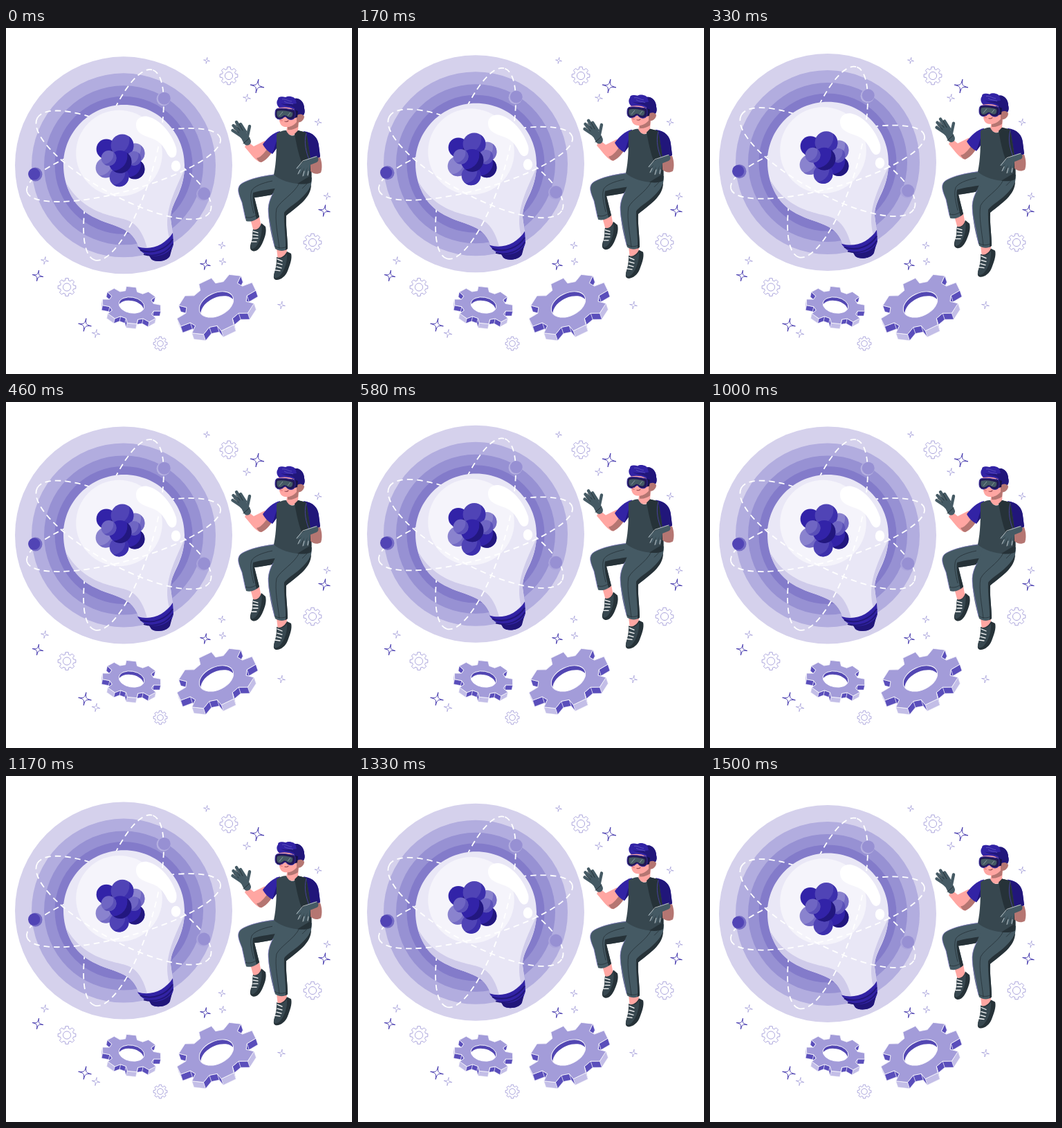
An HTML page that plays this animation: 500 by 500 pixels, repeating every 1540 ms.

```html
<!DOCTYPE html>
<html lang="en">
<head>
<meta charset="utf-8">
<title>Floating idea</title>
<style>
html,body{margin:0;width:100%;height:100%;overflow:hidden;background:#fff}
svg{display:block;width:100%;height:100%}
.dash{fill:none;stroke:#fff;stroke-width:1.8;stroke-dasharray:8.5 6}
.skin{fill:#ffa6a2}.skinD{fill:#b57672}
.v{fill:#37474f}.vD{fill:#263238}.pant{fill:#455a64}
.p{fill:#3223a5}.pD{fill:#21167a}
.lace{fill:none;stroke:#fff;stroke-width:1.3;stroke-linecap:round}
.seam{fill:none;stroke:#263238;stroke-width:.8}
.edge{fill:none;stroke:#8a82d0;stroke-width:.7}
.hand path{fill:none;stroke-linecap:round;stroke-linejoin:round}
</style>
</head>
<body>
<svg viewBox="0 0 500 500">
<g id="deco"></g>
<g id="gears"></g>
<g id="bulb">
  <g id="rings"></g>
  <g id="back"></g>
  <path fill="#e9e7f6" d="M170.5 111C219 111 258 150 258 198C258 240 237 252 238 276L241 298L216 320L192 317C188 305 181 295 166 289C150 282 135 279 119 269C97 255 83 228 83 198C83 150 122 111 170.5 111Z"/>
  <path fill="#cfcbea" d="M87 224C94 249 106 261 119 269C135 279 150 282 166 289C181 295 188 305 192 317L204 318C200 303 194 289 182 281C166 270 118 276 87 224Z"/>
  <path fill="#cfcbea" d="M258 204C256 238 237 252 238 276L241 298L236 303C227 270 240 243 258 204Z"/>
  <circle cx="163.500" cy="181" r="62.300" fill="#f5f4fb"/>
  <path fill="#fff" d="M188 141C187 132 195 126 205 128C223 132 240 153 246 173C248 183 244 189 238 187C232 184 232 175 222 166C212 156 189 158 188 141Z"/>
  <ellipse cx="245.500" cy="199.500" rx="6.700" ry="8" fill="#fff"/>
  <path class="p" d="M190 316C209 322 230 314 241 296L242 312C241 319 237 322 237 329C233 338 215 339 210 334L207 329C199 327 193 321 190 316Z"/>
  <path class="pD" d="M207 329C220 332 234 326 240 317C239 322 238 325 237 329C233 338 215 339 210 334Z"/>
  <path fill="none" stroke="#21167a" stroke-width="2" d="M194 321C213 328 232 319 241 305M199 327C216 332 233 325 241 312"/>
  <g id="atom"></g>
  <g id="front"></g>
  <g id="moons"></g>
</g>
<g id="man">
  <!-- legs -->
  <path class="skin" d="M353 276L366 272L369 288L358 294Z"/>
  <path class="skin" d="M391 318L406 318L405 333L393 336Z"/>
  <path class="vD" d="M357 291C362 293 367 289 369 282L375 287C377 295 374 303 370 312C366 320 361 324 356 322C351 320 353 313 355 308C357 302 356 297 357 291Z"/>
  <path class="v" d="M357 291C362 294 367 290 369 284C371 294 368 307 362 315C359 319 355 320 354 318C353 314 355 310 356 306C357 301 356 296 357 291Z"/>
  <path class="lace" d="M357 294l7 2M357 299l7 1M357 304l7 0M355 309l7 0"/>
  <path class="vD" d="M391 331C397 334 403 329 406 323L412 326C414 333 410 343 407 351C404 359 396 365 390 364C385 363 387 356 389 350C391 343 391 337 391 331Z"/>
  <path class="v" d="M391 331C397 335 403 331 406 326C407 337 403 350 396 358C392 362 388 362 387 359C387 355 390 349 390 345C392 340 391 336 391 331Z"/>
  <path class="lace" d="M392 334l7 3M392 340l7 2M391 345l7 2M389 350l7 1"/>
  <path class="pant" d="M392 211C372 213 346 219 338 227C333 233 337 242 341 252L347 279C354 281 361 278 366 273L359 245C376 243 391 240 402 235Z"/>
  <path class="vD" d="M398 230C385 233 369 234 357 238C355 249 359 262 362 276L366 273L359 245C376 243 391 240 402 235Z"/>
  <path class="seam" d="M385 221C370 224 358 229 355 235C352 244 355 255 358 268M346 273C353 276 360 272 365 268"/>
  <path class="edge" d="M388 212C370 214 346 219 338 227C333 233 337 242 341 252L346 276"/>
  <path class="pant" d="M394 215C390 235 378 248 379 264C380 285 384 302 389 319C395 323 402 323 407 319C407 302 404 286 405 271C421 258 442 244 442 216Z"/>
  <path class="vD" d="M441 226C433 247 409 257 402 267C401 284 405 305 404 321L407 319C407 302 404 286 405 271C421 258 441 246 441 226Z"/>
  <path class="seam" d="M424 224C416 240 397 249 391 261C388 277 393 299 395 319M388 315C394 319 401 319 407 315M435 225L428 232"/>
  <path class="edge" d="M386 239C379 250 378 262 380 275L388 316"/>
  <!-- raised arm -->
  <path class="skin" d="M349 164L358 171L374 163L386 176C382 184 375 191 369 194C362 194 353 181 345 172Z"/>
  <path class="skinD" d="M362 188C370 187 375 176 381 172L385 178C381 186 374 192 369 194C366 194 364 191 362 188Z"/>
  <path class="p" d="M396 149C386 151 377 160 371 168C374 174 379 179 385 182L393 171Z"/>
  <path class="pD" d="M393 157L385 182L393 171Z"/>
  <g class="hand" stroke="#455a64">
    <path stroke-width="4.400" d="M338 155L327.500 148M339 151L328.500 141M342 150L333 136M346 150L339 139M349 156L352 142"/>
    <path stroke-width="11" d="M341 153L345 157L348.500 164"/>
    <path stroke="#263238" stroke-width="1" d="M336 151L329 145M338 148L332 140M342 148L337 139M343 167L352 159"/>
  </g>
  <!-- torso -->
  <path class="skin" d="M407 137L423 132L422 150C416 158 409 156 405 150Z"/>
  <path class="skinD" d="M407 143C415 142 419 137 423 133L422 143C417 146 412 148 407 147Z"/>
  <path class="p" d="M430 149C444 151 451 159 452 170L454 186C449 190 443 191 437 189Z"/>
  <path class="pD" d="M431 150C444 151 451 159 452 170L454 186C449 190 443 191 437 189C432 176 430 161 431 150Z"/>
  <path class="v" d="M405 148C400 148 394 150 391 153C391 173 391 194 387 212C398 222 424 229 441 223C443 201 438 176 434 151L422 148C419 158 409 158 405 148Z"/>
  <path class="vD" d="M422 148L434 151C438 176 443 201 441 223C435 226 428 226 421 225L439 214C425 198 421 174 417 153Z"/>
  <path fill="none" stroke="#5044b6" stroke-width=".8" d="M434 152C430 166 434 180 438 190"/>
  <!-- lowered arm -->
  <path class="skinD" d="M440 189L454 187C457 195 457 203 455 209C450 212 444 211 440 207Z"/>
  <g class="hand" stroke="#455a64">
    <path stroke-width="9" d="M447 190L437 194L432 197"/>
    <path stroke-width="4" d="M432 194L422 202M432 197L424 209M434 199L430.500 212M438 198L436 211"/>
    <path stroke="#d7dde0" stroke-width=".8" d="M420 203L429 192L449 185.500M422 211L425 205M429 214L431 207M436 213L437 207"/>
  </g>
  <!-- head -->
  <path class="skin" d="M394 114C392 120 395 126 395 132C395 138 398 142 403 143C412 144 419 139 422 130L422 113Z"/>
  <path class="p" d="M395 115C390 111 391 105 393 103C393 98 400 99 404 100C409 97 416 100 418 102C425 101 431 108 431 116C433 123 430 129 424 128L418 126L417 118C410 114 402 114 395 115Z"/>
  <path class="pD" d="M418 102C425 101 431 108 431 116C433 123 430 129 424 128L418 126L417 116C412 112 404 113 397 109C406 111 413 110 420 109Z"/>
  <path fill="none" stroke="#6b61c4" stroke-width=".7" d="M399 103C405 102 408 106 413 106M402 106C406 109 411 108 415 110"/>
  <path class="skinD" d="M420 127C423 123 430 124 431 128C431 133 425 138 420 136Z"/>
  <path fill="#171248" d="M413 117L422 120L421 129L414 131Z"/>
  <path fill="#211855" stroke="#372aa5" d="M391 117C398 115 410 117 417 119C419 122 418 129 416 131C412 134 407 132 404 128C401 128 400 132 396 132C391 132 389 129 389 125C389 121 389 119 391 117Z"/>
  <path fill="#455a64" d="M392 120C398 118 409 120 414 122C415 126 413 129 411 129C406 129 406 126 402 126C399 128 397 130 394 129C391 128 391 123 392 120Z"/>
  <path fill="none" stroke="#8998a0" stroke-width="1" d="M395 127L400 121M407 127L411 122"/>
  <path fill="none" stroke="#9d4f54" stroke-width="1.200" stroke-linecap="round" d="M403 135Q406 136 408 134"/>
  <path fill="none" stroke="#e47c7d" d="M398 131L397 134L400 134"/>
</g>
</svg>
<script>
const NS = 'http://www.w3.org/2000/svg';
const $ = id => document.getElementById(id);
const rad = a => a * Math.PI / 180;

function add(parent, tag, attrs) {
  const el = document.createElementNS(NS, tag);
  for (const k in attrs) el.setAttribute(k, attrs[k]);
  return parent.appendChild(el);
}
const circle = (g, cx, cy, r, fill) => add(g, 'circle', { cx, cy, r, fill });
const poly = pts => 'M' + pts.map(p => p.map(n => n.toFixed(2)).join(' ')).join('L') + 'Z';

// Eight-tooth outline, mapped onto a tilted ellipse
function cog(x, y, a, b, tilt, phase = 0, root = .77) {
  const c = Math.cos(rad(tilt)), s = Math.sin(rad(tilt)), pts = [];
  for (let i = 0; i < 8; i++) {
    for (const [da, r] of [[-15, root], [-9.5, 1], [9.5, 1], [15, root]]) {
      const t = rad(i * 45 + phase + da);
      const u = a * r * Math.cos(t), v = b * r * Math.sin(t);
      pts.push([x + u * c - v * s, y + u * s + v * c]);
    }
  }
  return pts;
}

function solidGear(id, x, y, a, b, tilt, phase, dx, dy, hole) {
  const g = $('gears'), pts = cog(x, y, a, b, tilt, phase);
  // Tooth tips catch the light; flanks and gaps stay dark
  const sides = pts.map((p, i) => ({ p, q: pts[(i + 1) % pts.length], tip: i % 4 === 1 }))
    .sort((m, n) => m.p[1] + m.q[1] - n.p[1] - n.q[1]);
  for (const { p, q, tip } of sides) {
    add(g, 'path', {
      d: poly([p, q, [q[0] + dx, q[1] + dy], [p[0] + dx, p[1] + dy]]),
      fill: tip ? '#c3beE7' : '#5a4ebb', stroke: '#fff', 'stroke-width': .5
    });
  }
  add(g, 'path', { d: poly(pts), fill: '#a39cd9', stroke: '#fff', 'stroke-width': .8 });
  const oval = { cx: x, cy: y, rx: a * hole, ry: b * hole, transform: `rotate(${tilt} ${x} ${y})` };
  add(add(g, 'clipPath', { id }), 'ellipse', oval);
  add(g, 'ellipse', { ...oval, fill: '#5347b3' });
  add(add(g, 'g', { 'clip-path': `url(#${id})` }), 'ellipse',
    { ...oval, fill: '#fff', transform: `translate(${dx * .7} ${dy * .7}) ${oval.transform}` });
  add(g, 'ellipse', { ...oval, fill: 'none', stroke: '#fff', 'stroke-width': .9 });
}

function lineGear(x, y, r) {
  const style = { fill: '#fff', stroke: '#a39cd9', 'stroke-width': .9, 'stroke-linejoin': 'round' };
  add($('deco'), 'path', { d: poly(cog(x, y, r, r, 0, 0, .76)), ...style });
  add($('deco'), 'circle', { cx: x, cy: y, r: r * .43, ...style });
}

function spark(x, y, r, dark) {
  const k = r * .1, c = (sx, sy) => `C${sx * k} ${sy * k} ${sx * k} ${sy * k} `;
  add($('deco'), 'path', {
    d: `M0 ${-r}${c(1, -1)}${r} 0${c(1, 1)}0 ${r}${c(-1, 1)}${-r} 0${c(-1, -1)}0 ${-r}Z`,
    transform: `translate(${x} ${y}) rotate(11)`,
    fill: '#fff', stroke: dark ? '#4134ac' : '#9c95d6', 'stroke-width': dark ? .9 : .7
  });
}

function ball(g, x, y, r, fill, shade) {
  circle(g, x, y, r, fill);
  const u = r * .6, v = r * .8, R = r * 1.3;
  add(g, 'path', {
    d: `M${x + u} ${y - v}A${r} ${r} 0 0 1 ${x - u} ${y + v}A${R} ${R} 0 0 0 ${x + u} ${y - v}Z`,
    fill: shade
  });
}

function orbit(a, b, tilt) {
  for (const [id, sweep] of [['back', 1], ['front', 0]]) {
    add($(id), 'path', {
      class: 'dash', d: `M${-a} 0A${a} ${b} 0 0 ${sweep} ${a} 0`,
      transform: `translate(170 198) rotate(${tilt})`
    });
  }
}

[[157, '#d5d1ec'], [133, '#b2addf'], [115, '#9791d3'], [99.5, '#837bca']]
  .forEach(([r, c]) => circle($('rings'), 170, 198.4, r, c));

orbit(142, 45, 28.5);
orbit(145, 37.6, -15.5);
orbit(143.6, 42, -73.1);

const deep = ['#3223a8', '#22177f'], mid = ['#5044b6', '#3c2fac'];
const soft = ['#6f66c3', '#5a50b8'], pale = ['#8a83ce', '#736ac4'];
[
  [145, 175, 14, deep], [186, 181, 14, pale], [144, 202, 14, pale],
  [186, 204, 14, deep], [163.5, 215.5, 13.5, mid], [168, 170, 16, mid],
  [185, 188.5, 10, soft], [165, 193.5, 16, deep], [148.5, 188, 10.5, soft]
].forEach(([x, y, r, [c, d]]) => ball($('atom'), x, y, r + .4, c, d));

const moons = $('moons');
circle(moons, 42.5, 211.5, 10, '#756cc5');
circle(moons, 40.7, 211, 8.6, '#5144b5');
circle(moons, 227.5, 102.5, 10, '#b4afe0');
circle(moons, 228.7, 101.7, 9, '#9790d3');
circle(moons, 285, 240, 10, '#aaa4dc');
circle(moons, 286.2, 239.4, 9, '#9790d3');

solidGear('holeA', 304, 399.5, 61, 38, -25.6, 0, 3, 9, .43);
solidGear('holeB', 181.5, 400.5, 43, 26.5, 10, -7, -1.5, 7, .43);

[[322, 69, 13], [88, 374.5, 13], [443, 310, 13], [223, 456, 10]].forEach(g => lineGear(...g));
[
  [290, 47, 4.5], [348, 101, 5.5], [451, 136, 5], [464, 243, 5], [312, 314, 5],
  [313, 337.5, 5], [398, 400.5, 5.5], [56, 336, 5.5], [130, 441.5, 6],
  [363, 84, 10, 1], [460, 264, 8.5, 1], [288, 342, 7.5, 1], [46, 358, 8, 1], [114, 429, 9.5, 1]
].forEach(s => spark(...s));

const LOOP = 1540, STEPS = 37, LIFT = 10;

function draw(ms) {
  const step = Math.floor((ms % LOOP) / LOOP * STEPS + .12);
  const u = (step + 1) % STEPS / STEPS;
  const y = .5 - LIFT * (1 - Math.abs(1 - 2 * u));
  for (const id of ['bulb', 'man']) $(id).setAttribute('transform', `translate(0 ${y.toFixed(2)})`);
}

let start;
function tick(now) {
  start ??= now;
  draw(now - start);
  requestAnimationFrame(tick);
}
draw(0);
requestAnimationFrame(tick);
</script>
</body>
</html>
```
